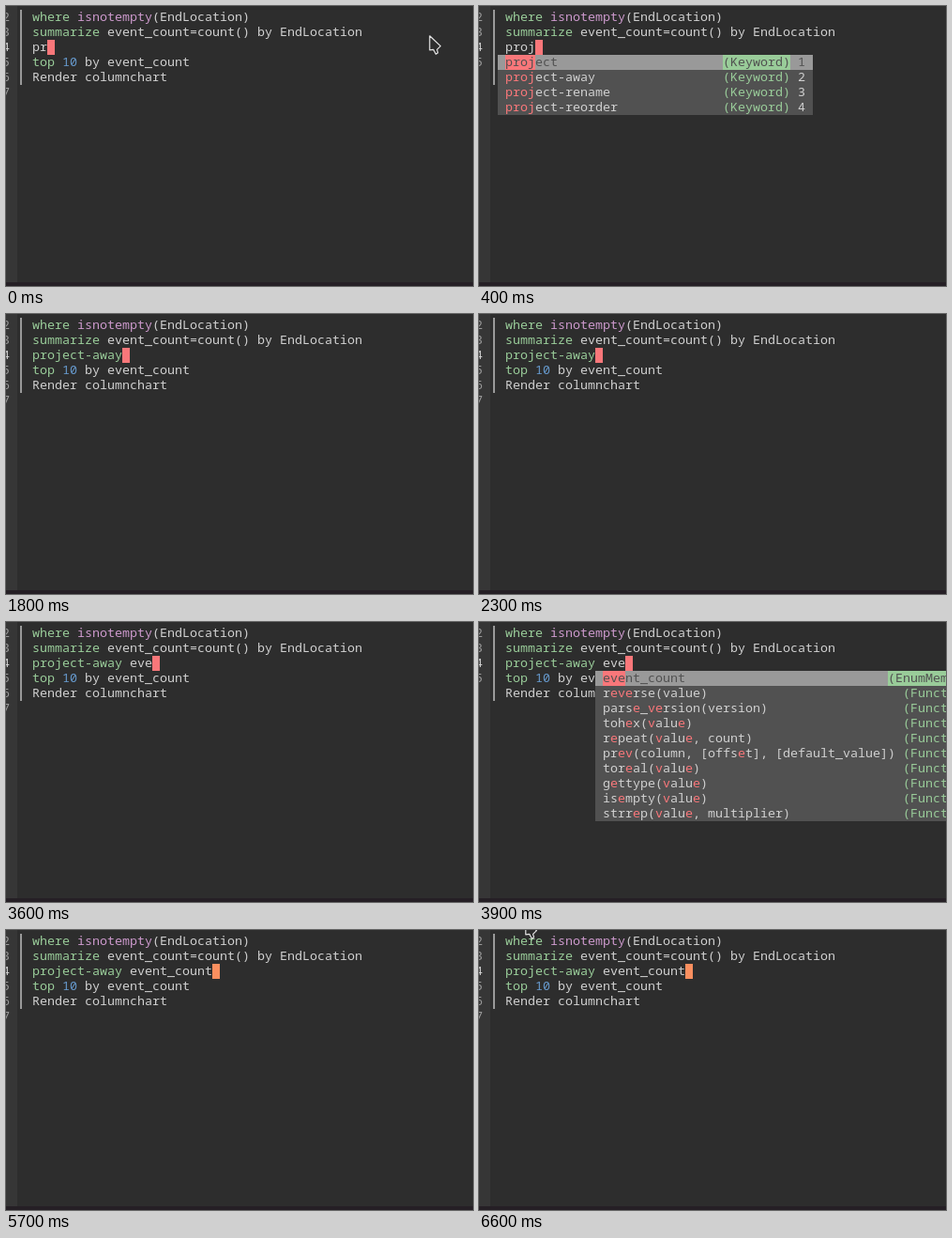
These frames come from a looping animation (498 by 298 pixels, 6.7 s). An HTML page:

```html
<!DOCTYPE html>
<html lang="en">
<head>
<meta charset="utf-8">
<title>Query editor completion</title>
<style>
  html, body { margin: 0; width: 100%; height: 100%; overflow: hidden; background: #2d2d2d; }
  svg { display: block; width: 498px; height: 298px; }
  text { font: 13.333px "Noto Sans Mono", "DejaVu Sans Mono", monospace; white-space: pre; }
</style>
</head>
<body>
<svg id="stage" viewBox="0 0 498 298"></svg>
<script>
const LOOP = 6700, CELL = 8, ROW = 16, LEFT = 28;
const C = {
  bg: '#2d2d2d', gutter: '#363636', fg: '#d0d0d0', dim: '#999999', menu: '#515151',
  green: '#99cc99', red: '#f9777a', purple: '#cc99cc', blue: '#6699cc', orange: '#fb8f5f'
};
const stage = document.getElementById('stage');
const rowTop = row => 4 + row * ROW;

function add(parent, tag, attrs = {}) {
  const el = document.createElementNS('http://www.w3.org/2000/svg', tag);
  for (const key in attrs) el.setAttribute(key, attrs[key]);
  return parent.appendChild(el);
}
const box = (parent, x, y, width, height, fill) =>
  add(parent, 'rect', { x, y, width, height, fill });

function write(parent, x, row, str, fill = C.fg) {
  const el = add(parent, 'text', { x, y: rowTop(row) + 12, fill });
  el.textContent = str;
  return el;
}

// parts: alternating text and colour
function writeLine(parent, x, row, ...parts) {
  for (let i = 0; i < parts.length; i += 2) {
    write(parent, x, row, parts[i], parts[i + 1]);
    x += parts[i].length * CELL;
  }
}

// Positions where the query letters occur in order
function matches(str, query) {
  let from = 0;
  return [...query].map(ch => {
    const at = str.indexOf(ch, from);
    from = at + 1;
    return at;
  });
}

function makeMenu(m, selected) {
  const group = add(stage, 'g');
  m.items.forEach(([label, kind], i) => {
    const row = 3 + i, y = rowTop(row), active = i === selected;
    const x = m.x + CELL, tagX = m.tagEnd - kind.length * CELL;
    const hits = matches(label, m.query);
    box(group, m.x, y, m.width, ROW, active ? C.dim : C.menu);
    if (active) {
      box(group, x, y, m.query.length * CELL, ROW, C.red);
      box(group, tagX, y, kind.length * CELL, ROW, C.green);
    }
    const line = write(group, x, row, '');
    [...label].forEach((ch, k) => {
      const fill = active ? C.menu : hits.includes(k) ? C.red : C.fg;
      add(line, 'tspan', { fill }).textContent = ch;
    });
    write(group, tagX, row, kind, active ? C.menu : C.green);
    write(group, m.tagEnd + CELL, row, String((i + 1) % 10), active ? C.menu : C.fg);
  });
  return group;
}

// Editor
box(stage, 0, 0, 498, 298, C.bg);
box(stage, 0, 0, 12, 294, C.gutter);
box(stage, 0, 294, 498, 4, '#251f25');
box(stage, 15, 4, 2, 5 * ROW, C.dim);
const numbers = [2, 3, 4, 5, 6, 7].map((n, i) =>
  write(stage, -4, i, String(n), n === 4 ? C.fg : C.dim));
numbers[2].setAttribute('font-weight', 'bold');

writeLine(stage, LEFT, 0, 'where ', C.green, 'isnotempty', C.purple, '(EndLocation)', C.fg);
writeLine(stage, LEFT, 1, 'summarize', C.green, ' event_count=count() by EndLocation', C.fg);
writeLine(stage, LEFT, 3, 'top ', C.green, '10', C.blue, ' by event_count', C.fg);
write(stage, LEFT, 4, 'Render columnchart');

const KEYWORD = 'project-away', TYPED = KEYWORD + ' event_count';
const keyword = write(stage, LEFT, 2, '');
const column = write(stage, LEFT + (KEYWORD.length + 1) * CELL, 2, '');
const caret = box(stage, LEFT, rowTop(2), CELL, ROW, C.red);

// Popups
const keywordMenu = {
  x: 20, width: 336, tagEnd: 332, query: 'proj',
  items: ['project', 'project-away', 'project-rename', 'project-reorder'].map(s => [s, '(Keyword)'])
};
const columnMenu = {
  x: 124, width: 374, tagEnd: 532, query: 'eve',
  items: [['event_count', '(EnumMember)'], ...[
    'reverse(value)', 'parse_version(version)', 'tohex(value)', 'repeat(value, count)',
    'prev(column, [offset], [default_value])', 'toreal(value)', 'gettype(value)',
    'isempty(value)', 'strrep(value, multiplier)'
  ].map(s => [s, '(Function)'])]
};
const popups = [
  [400, 1400, makeMenu(keywordMenu, 0)],
  [1400, 1800, makeMenu(keywordMenu, 1)],
  [2000, 2300, box(stage, 20, 52, 186, 60, C.menu)],
  [3900, 4700, makeMenu(columnMenu, 0)]
];

const pointer = add(stage, 'path', {
  d: 'M.8.8V15.8L4.7 15.3 7.4 20.3 9.6 18.8 8.6 15.4 12.4 11.6Z',
  fill: C.bg, stroke: '#e4e4e4', 'stroke-width': 1.2, 'stroke-linejoin': 'round'
});

// Timeline: [time, typed length], and spans with the caret blinked off
const keys = [[0, 2], [100, 3], [200, 4], [1800, 12], [2400, 13],
  [3200, 14], [3400, 15], [3600, 16], [4700, 24]];
const blinks = [[700, 1200], [2900, 3200], [4100, 4600], [5200, 5600], [6100, 6600]];

const within = (t, from, to) => t >= from && t < to;
const show = (el, on) => el.setAttribute('display', on ? 'inline' : 'none');

function pointerAt(t) {
  if (t < 100) return [451, 31];
  if (within(t, 5600, 5700)) return [377, 8];
  if (t < 6000) return null;
  const p = Math.floor((t - 6000) / 100) / 6;
  return [150 - 101 * p, 20 - 31 * p];
}

function render(t) {
  const length = keys.filter(([at]) => at <= t).pop()[1];
  const text = TYPED.slice(0, length);
  keyword.textContent = text.slice(0, KEYWORD.length);
  keyword.setAttribute('fill', length < KEYWORD.length ? C.fg : C.green);
  column.textContent = text.slice(KEYWORD.length + 1);

  caret.setAttribute('x', LEFT + length * CELL);
  caret.setAttribute('fill', t < 5600 ? C.red : C.orange);
  show(caret, !blinks.some(([from, to]) => within(t, from, to)));

  popups.forEach(([from, to, el]) => show(el, within(t, from, to)));
  const menuOpen = within(t, 400, 1800) || within(t, 3900, 4700);
  numbers.slice(4).forEach(el => show(el, !menuOpen));

  const pos = pointerAt(t);
  show(pointer, pos);
  if (pos) pointer.setAttribute('transform', `translate(${pos})`);
}

const start = performance.now();
function tick() {
  render((performance.now() - start) % LOOP);
  requestAnimationFrame(tick);
}
tick();
</script>
</body>
</html>
```
